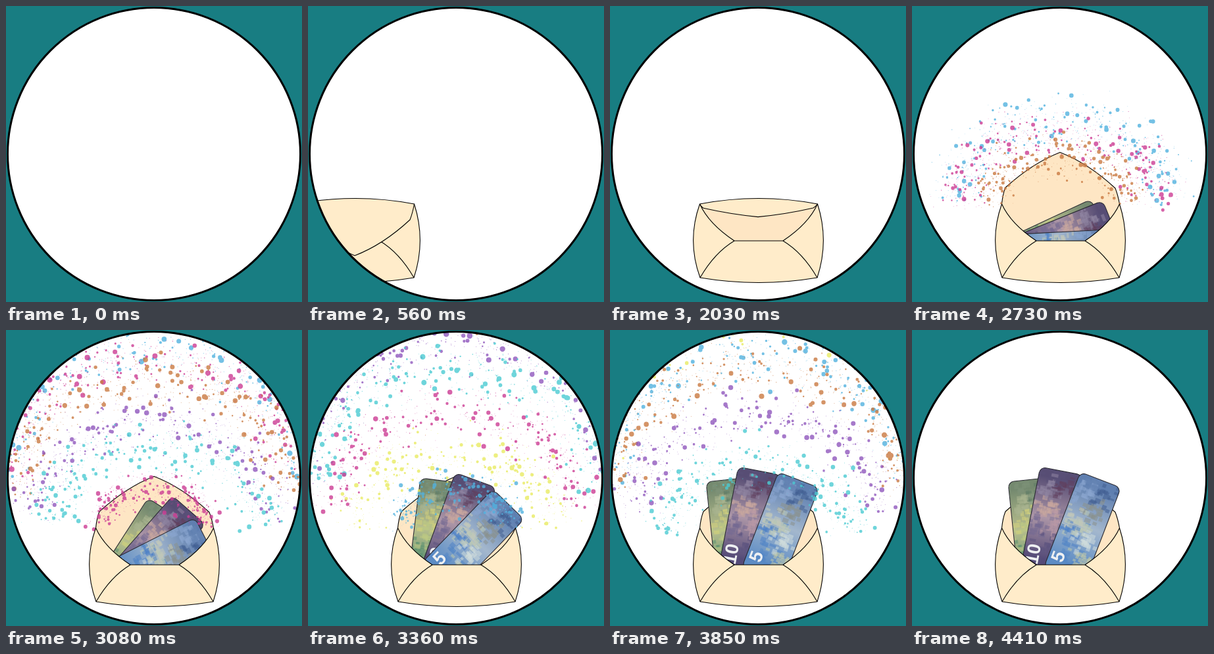
Write an HTML page that moves like this. It is 450x450 px and loops after 7300 ms.

```html
<!DOCTYPE html>
<html lang="en">
<head>
<meta charset="utf-8">
<title>Envelope with notes</title>
<style>
html, body { margin: 0; width: 100%; height: 100%; overflow: hidden; background: #187d82; }
svg { display: block; width: 100%; height: 100%; }
.line { stroke: #000; stroke-width: 1.1; stroke-linejoin: round; }
.edge { fill: none; stroke: #2b2b33; stroke-width: 1.1; }
text { font: bold 28px "Liberation Sans", Arial, sans-serif; text-anchor: middle; fill: #eef0f2; }
</style>
</head>
<body>
<svg viewBox="0 0 450 450">
  <defs>
    <clipPath id="disc"><circle cx="225" cy="225" r="222"/></clipPath>
    <clipPath id="card"><rect width="66" height="155" rx="9"/></clipPath>
  </defs>
  <rect width="450" height="450" fill="#187d82"/>
  <circle cx="225" cy="225" r="222" fill="#fff"/>
  <g clip-path="url(#disc)">
    <g id="envelope">
      <path id="flapBack" class="line" fill="#fee6c4"/>
      <path fill="#fee6c4" d="M136.5 301H315.5Q333 357 315 413Q226 428 137 413Q116.500 357 136.5 301Z"/>
      <g id="notes"></g>
      <g id="splats"></g>
      <path class="line" fill="#ffecca" d="M136.500 301Q116.500 357 137 413Q226 428 315 413Q333.500 357 315.500 301Q302 331 263 357H189Q150 331 136.500 301Z"/>
      <path class="line" fill="none" d="M189 357Q159 375 137 413M263 357Q293 375 315 413"/>
      <path id="flapFront" class="line" fill="#ffecca"/>
    </g>
  </g>
  <circle cx="225" cy="225" r="222.500" fill="none" stroke="#000" stroke-width="3"/>
</svg>
<script>
const LOOP = 7300, STEP = 70, LAST = 63;
const CARD_W = 66, CARD_H = 155;
const NS = "http://www.w3.org/2000/svg";
const $ = id => document.getElementById(id);

let seed = 7;
const rand = () => (seed = (seed * 16807) % 2147483647) / 2147483647;
const bell = () => rand() + rand() + rand() - 1.5;
const mix = (a, b, k) => a + (b - a) * k;
const clamp = v => Math.max(0, Math.min(1, v));

function add(parent, tag, attrs) {
  const el = document.createElementNS(NS, tag);
  for (const key in attrs) el.setAttribute(key, attrs[key]);
  return parent.appendChild(el);
}

// Poses are [x, y, tilt] of the top left corner; spots are [x, y, colour] on the card.
const notes = [
  { from: [272, 294, 65], mid: [171, 225, 7], to: [146, 231, -6], end: 50,
    shades: ["#74896f", "#b9bf8d", "#5f8e70"],
    spots: [[25, 8, "#7f9378"], [45, 22, "#5f7c66"], [15, 35, "#a9b490"], [22, 60, "#d3d27c"],
            [45, 50, "#93a78a"], [15, 85, "#bcc884"], [16, 108, "#5e9272"]] },
  { from: [290, 296, 68], mid: [224, 217, 20], to: [195, 208, 11], end: 50, label: "10",
    shades: ["#574d74", "#ab95a6", "#554b78"],
    spots: [[30, 8, "#5a5078"], [45, 28, "#62405f"], [14, 35, "#9186a3"], [22, 58, "#cda99f"],
            [50, 62, "#857898"], [36, 84, "#bb9aa6"], [12, 92, "#756a92"], [32, 118, "#5d5480"]] },
  { from: [295, 340, 87], mid: [281, 242, 44], to: [256, 216, 21], end: 52, label: "5",
    shades: ["#5f7fb0", "#a3b7cd", "#5d8cc4"],
    spots: [[28, 8, "#6685b4"], [48, 24, "#425f92"], [14, 34, "#8aa6d0"], [40, 52, "#8b928f"],
            [18, 66, "#c3c8bb"], [10, 92, "#4f82c6"], [44, 96, "#cfdcdd"], [28, 80, "#bcc8b4"],
            [22, 126, "#5488c6"], [50, 126, "#bfc9a9"]] }
];

function buildNote(note, index) {
  const shade = add(document.querySelector("defs"), "linearGradient",
    { id: "shade" + index, x2: 0, y2: 1 });
  note.shades.forEach((color, i) =>
    add(shade, "stop", { offset: .08 + .4 * i, "stop-color": color }));
  note.el = add($("notes"), "g", {});
  const art = add(note.el, "g", { "clip-path": "url(#card)" });
  add(art, "rect", { width: CARD_W, height: CARD_H, fill: `url(#shade${index})` });
  for (let i = 0; i < 24; i++)
    for (const [x, y, color] of note.spots)
      add(art, "rect", {
        x: x - 4 + bell() * 20, y: y - 3 + bell() * 20,
        width: 4 + rand() * 7, height: 3 + rand() * 5, fill: color, opacity: .55
      });
  if (note.label)
    add(note.el, "text", { transform: "translate(24 132) rotate(-90)" }).textContent = note.label;
  add(note.el, "rect", { class: "edge", width: CARD_W, height: CARD_H, rx: 9 });
}

const BLUE = "#52b2df", PINK = "#cc3d94", ORANGE = "#ca7a42";
const PURPLE = "#9058bd", CYAN = "#4ccbd2", YELLOW = "#e9eb62";
const waves = [
  [34.4, BLUE], [35, PINK], [36.2, ORANGE], [38.2, PURPLE], [39.5, CYAN], [41.7, PINK],
  [44, YELLOW], [45.7, BLUE], [46.6, ORANGE], [48.9, PURPLE], [51.5, CYAN]
].map(([start, color]) => {
  const dots = [];
  for (let i = 0; i < 520; i++)
    dots.push({ angle: (rand() - .5) * 3.3, off: bell() * 38, lift: bell() * 16,
                size: .5 + 3.5 * rand() ** 5.5 });
  const layer = opacity => add($("splats"), "path", { fill: color, opacity });
  return { start, dots, fine: layer(.6), bold: layer(.8) };
});

function drawWave(wave, n) {
  const r = 30 * (n - wave.start);
  let fine = "", bold = "";
  if (r > 45 && n < LAST) {
    const young = Math.min(1, r / 110);
    const w = (95 + .47 * r) * young, h = (45 + .5 * r) * young;
    const base = 310 - r + h, grow = .75 + r / 900;
    for (const dot of wave.dots) {
      const off = dot.off * young;
      const x = 225 + (w + off) * Math.sin(dot.angle);
      const y = base - (h + off) * Math.cos(dot.angle) + dot.lift;
      const s = dot.size * grow, c = s.toFixed(2), d = (2 * s).toFixed(2);
      const ring = `M${(x - s).toFixed(1)} ${y.toFixed(1)}a${c} ${c} 0 1 0 ${d} 0a${c} ${c} 0 1 0 -${d} 0`;
      if (dot.size > 1) bold += ring; else fine += ring;
    }
  }
  wave.fine.setAttribute("d", fine);
  wave.bold.setAttribute("d", bold);
}

function drawNote(note, n) {
  const k = n < 48 ? (n - 39) / 9 : clamp((n - 48) / (note.end - 48));
  const [a, b] = n < 48 ? [note.from, note.mid] : [note.mid, note.to];
  const [x, y, tilt] = a.map((v, i) => mix(v, b[i], k));
  note.el.setAttribute("transform", `translate(${x} ${y}) rotate(${tilt})`);
}

// fold runs from 1 (closed) to -1 (open)
function flapPath(fold) {
  const p = (x, y) => `${x} ${301 + fold * (y - 301)}`;
  const top = fold > 0 ? "M136.5 301Q226 284 315.5 301" : "M315.5 301";
  return `${top}Q${p(313, 315)} ${p(309, 325)}Q${p(268, 363)} ${p(225, 379.5)}` +
         `Q${p(183, 363)} ${p(142, 326)}Q${p(138, 316)} ${p(136.5, 301)}`;
}

function draw(n) {
  const slide = n < 15 ? -154 + 22.25 * (n - 8) : 0;
  const rock = n > 15 && n < 25 ? -4.9 * Math.sin(Math.PI * (n - 15) / 5) : 0;
  $("envelope").setAttribute("transform", `translate(${slide} 0) rotate(${rock} 226 357)`);
  $("envelope").setAttribute("visibility", n < 2 ? "hidden" : "visible");

  const fold = 1 - 2 * clamp((n - 26) / 8);
  $("flapFront").setAttribute("d", fold > 0 ? flapPath(fold) : "");
  $("flapBack").setAttribute("d", fold > 0 ? "" : flapPath(fold));

  $("notes").setAttribute("display", n < 36 ? "none" : "inline");
  notes.forEach(note => drawNote(note, n));
  waves.forEach(wave => drawWave(wave, n));
}

notes.forEach(buildNote);
const begin = performance.now();
let shown = -1;
function tick() {
  const t = (performance.now() - begin) % LOOP;
  const n = Math.min(LAST, Math.floor(t / STEP));
  if (n !== shown) draw(shown = n);
  requestAnimationFrame(tick);
}
tick();
</script>
</body>
</html>
```
